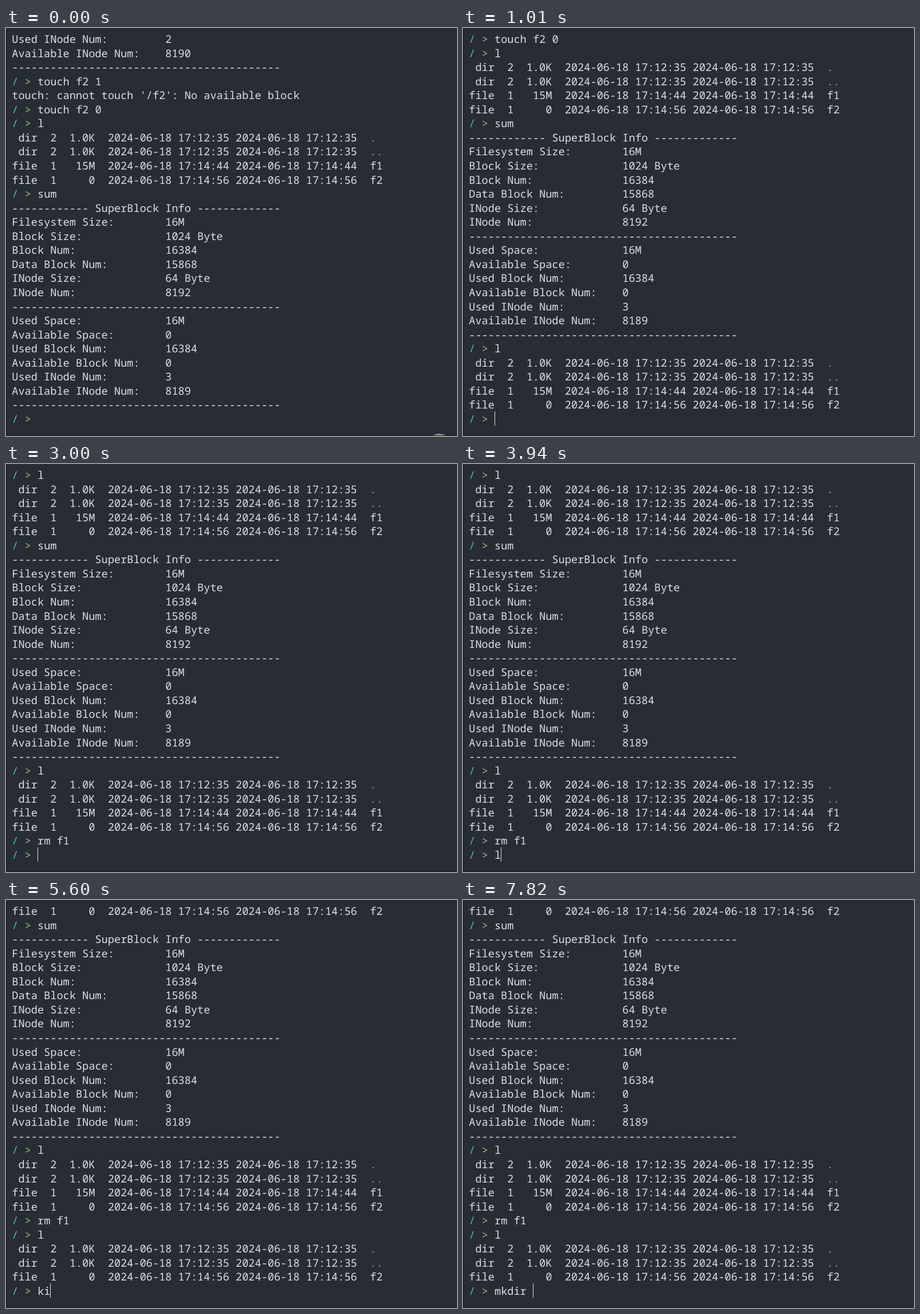
Write an HTML page that moves like this. It is 787 by 712 pixels and loops after 8000 ms.

```html
<!DOCTYPE html>
<html lang="en">
<head>
<meta charset="utf-8">
<title>Terminal session</title>
<style>
  html, body { margin: 0; width: 100%; height: 100%; overflow: hidden; background: #282c34; }
  svg { display: block; }
  text {
    font: 18.6px "Noto Sans Mono", "DejaVu Sans Mono", monospace;
    font-variant-ligatures: none;
    text-rendering: geometricPrecision;
    white-space: pre;
    fill: #dcdfe4;
  }
  .path { fill: #56b6c2; }
  .mark { fill: #a5bd83; }
  .dir { fill: #61afcf; }
</style>
</head>
<body>
<svg width="787" height="712" viewBox="0 0 787 712">
  <rect width="787" height="712" fill="#282c34"/>
  <g id="rows"></g>
  <rect id="caret" y="669" width="1" height="25" fill="#dcdfe4"/>
  <g id="pointer">
    <circle id="halo" r="20" fill="#ffffbe" fill-opacity=".5"/>
    <path d="M-5.5 -9.2H-2Q0 -9.2 0 -7.5Q0 -9.2 2 -9.2H5.5M0 -8V8M-5.5 9.2H-2Q0 9.2 0 7.5Q0 9.2 2 9.2H5.5"
          fill="none" stroke="#dcdfe4" stroke-width="1.4"/>
  </g>
  <rect width="1.5" height="712" fill="#14161a"/>
  <rect y="711" width="787" height="1" fill="#1c1f25"/>
</svg>
<script>
const LOOP = 8000, ROWS = 28, LEFT = 10.3, CELL = 11.16, PITCH = 24.556, BASE = 26;
const $ = id => document.getElementById(id);

const rule = '-'.repeat(42);
const field = (name, value) => (name + ':').padEnd(24) + value;
const entry = (type, links, size, time, name) => {
  const stamp = '2024-06-18 ' + time;
  return `${type.padStart(4)}  ${links}  ${size.padStart(4)}  ${stamp} ${stamp}  ${name}`;
};
const dirs = ['.', '..'].map(name => entry('dir', 2, '1.0K', '17:12:35', name));
const f1 = entry('file', 1, '15M', '17:14:44', 'f1');
const f2 = entry('file', 1, '0', '17:14:56', 'f2');

const log = [
  field('Used INode Num', 2),
  field('Available INode Num', 8190),
  rule,
  '/ > touch f2 1',
  "touch: cannot touch '/f2': No available block",
  '/ > touch f2 0',
  '/ > l', ...dirs, f1, f2,
  '/ > sum',
  '------------ SuperBlock Info -------------',
  field('Filesystem Size', '16M'),
  field('Block Size', '1024 Byte'),
  field('Block Num', 16384),
  field('Data Block Num', 15868),
  field('INode Size', '64 Byte'),
  field('INode Num', 8192),
  rule,
  field('Used Space', '16M'),
  field('Available Space', 0),
  field('Used Block Num', 16384),
  field('Available Block Num', 0),
  field('Used INode Num', 3),
  field('Available INode Num', 8189),
  rule,
  '/ > l', ...dirs, f1, f2,
  '/ > rm f1',
  '/ > l', ...dirs, f2
];

// time, finished log lines, typed input, caret shown
const steps = [
  [0, 27, '', 0], [260, 27, '', 1], [800, 27, '', 0], [860, 27, 'l', 1],
  [1010, 32, '', 1], [1610, 32, '', 0], [1740, 32, 'r', 1], [1870, 32, 'rm', 1],
  [2340, 32, 'rm ', 1], [2600, 32, 'rm f', 1], [2800, 32, 'rm f1', 1],
  [3000, 33, '', 1], [3680, 33, '', 0], [3940, 33, 'l', 1],
  [4140, 37, '', 1], [4740, 37, '', 0], [5340, 37, '', 1], [5400, 37, 'k', 1],
  [5600, 37, 'ki', 1], [6200, 37, 'k', 1], [6530, 37, '', 1],
  [6730, 37, 'm', 1], [6800, 37, 'mk', 1], [7130, 37, 'mkd', 1],
  [7200, 37, 'mkdi', 1], [7270, 37, 'mkdir', 1], [7820, 37, 'mkdir ', 1]
];

// time, share of the way the pointer has covered
const moves = [[0, 0], [70, .25], [130, .55], [200, .85], [260, 1]];

const at = (table, t) => table.findLast(row => row[0] <= t);

const rows = Array.from({ length: ROWS }, (_, i) => {
  const row = document.createElementNS('http://www.w3.org/2000/svg', 'text');
  row.setAttribute('x', LEFT);
  row.setAttribute('y', Math.round(BASE + i * PITCH));
  return $('rows').appendChild(row);
});

const paint = line => line
  .replace(/>/g, '&gt;')
  .replace(/^\/ &gt;/, '<tspan class="path">/</tspan> <tspan class="mark">&gt;</tspan>')
  .replace(/^( dir.*  )(\.+)$/, '$1<tspan class="dir">$2</tspan>');

function render([, done, typed, caret]) {
  const lines = [...log.slice(done - ROWS + 1, done), '/ > ' + typed];
  lines.forEach((line, i) => rows[i].innerHTML = paint(line));
  $('caret').setAttribute('x', Math.round(LEFT + (4 + typed.length) * CELL));
  $('caret').style.display = caret ? '' : 'none';
}

function movePointer(t) {
  const p = at(moves, t)[1];
  const shown = t < 860 || (t >= 1470 && t < 1740);
  $('pointer').setAttribute('transform', `translate(${756 - 96.5 * p} ${728 - 140 * p})`);
  $('pointer').style.display = shown ? '' : 'none';
  $('halo').style.display = t < 330 ? '' : 'none';
}

let current;
const start = performance.now();
function tick() {
  const t = Math.max(0, performance.now() - start) % LOOP;
  const step = at(steps, t);
  if (step !== current) render(current = step);
  movePointer(t);
  requestAnimationFrame(tick);
}
tick();
</script>
</body>
</html>
```
